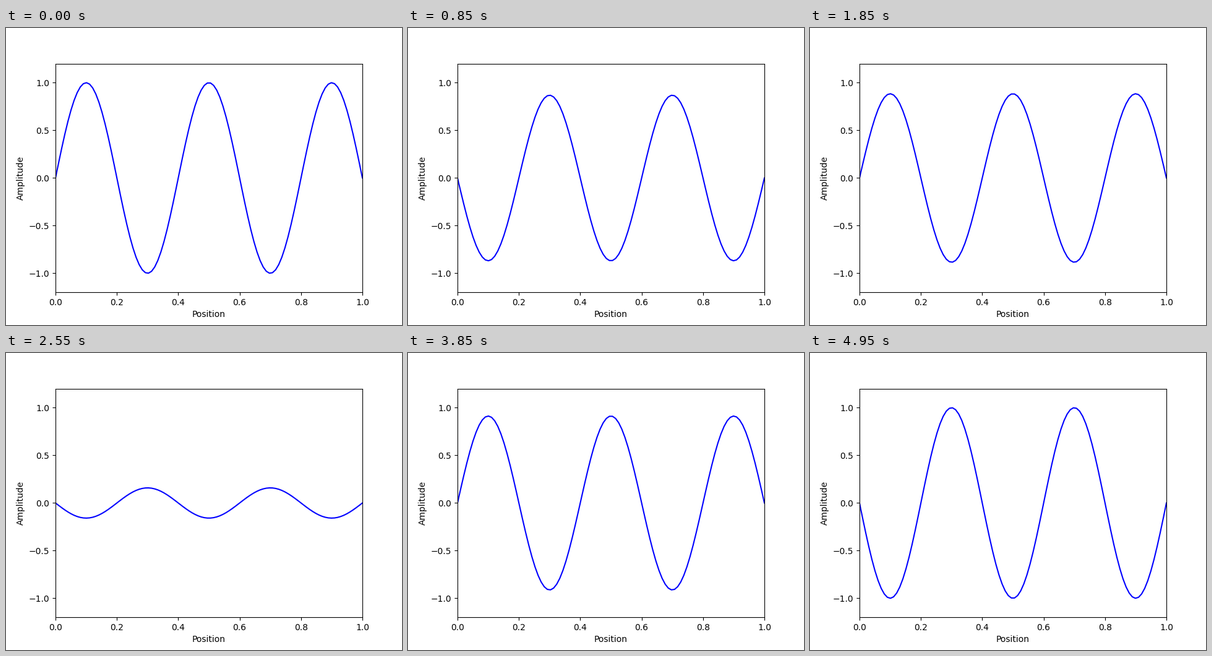
A matplotlib script for the animation above (5000 ms loop, 640 by 480 pixels).

```python
import matplotlib.pyplot as plt
import numpy as np
from matplotlib.animation import FuncAnimation

FRAMES = 100
INTERVAL = 50  # ms
POINTS = 100
HALF_WAVES = 5

x = np.linspace(0, 1, POINTS)
shape = np.sin(HALF_WAVES * np.pi * x)
step = HALF_WAVES * np.pi / (POINTS - 1)  # phase advance per frame


def amplitude(frame):
    """Standing wave released from rest: the first two frames are equal."""
    return np.cos(step * (frame - 0.5)) / np.cos(step / 2)


fig, ax = plt.subplots(figsize=(6.4, 4.8), dpi=100)
ax.set_xlim(0, 1)
ax.set_ylim(-1.2, 1.2)
ax.set_xlabel("Position")
ax.set_ylabel("Amplitude")
line, = ax.plot(x, shape, color="blue", lw=1.5)


def update(frame):
    line.set_ydata(amplitude(frame) * shape)
    return line,


anim = FuncAnimation(fig, update, frames=FRAMES, interval=INTERVAL,
                     repeat=True, repeat_delay=0)
plt.show()
```
